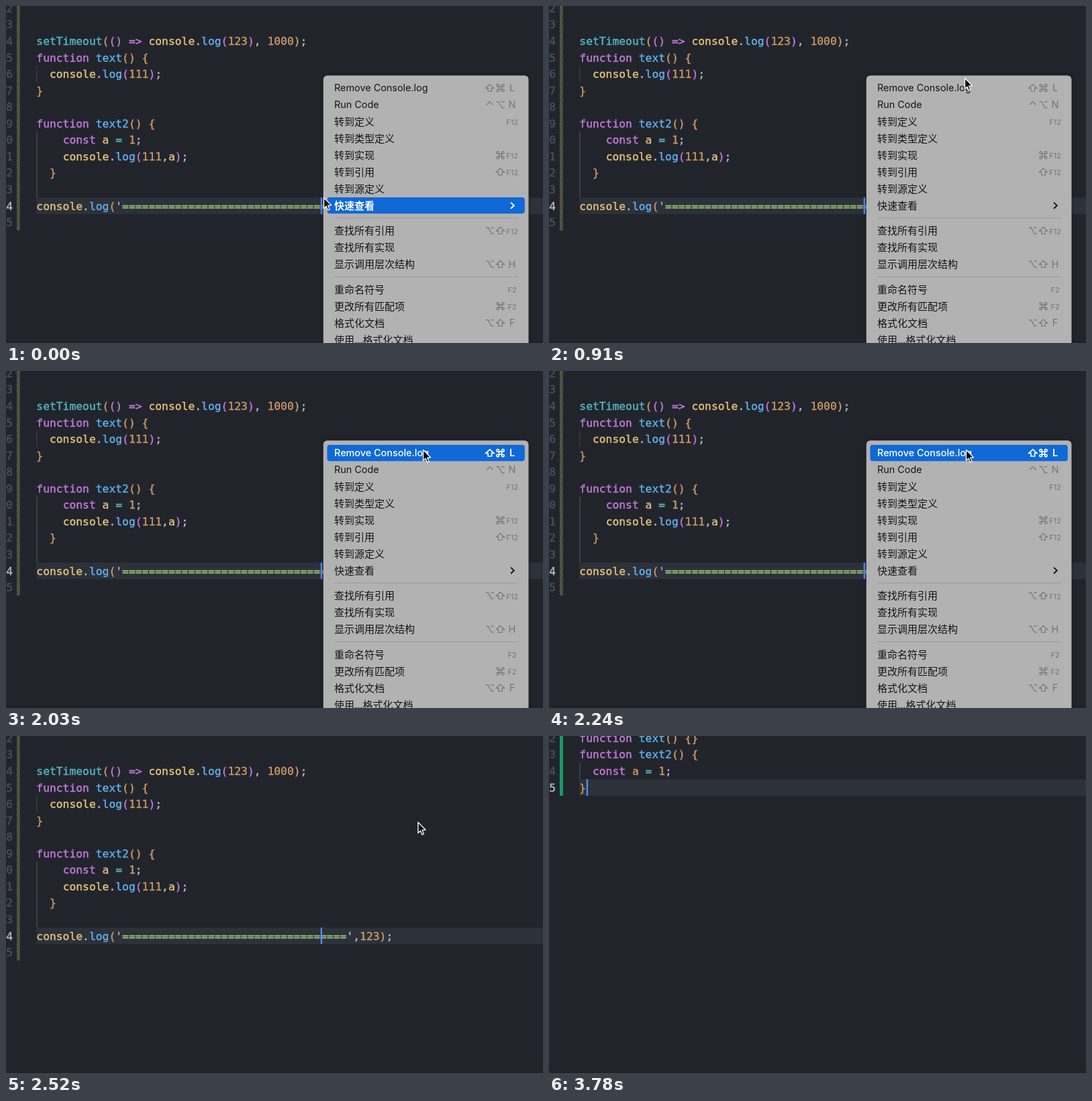
These frames come from a looping animation (800 px wide and 502 px high, 3.85 s). An HTML page with a canvas:

```html
<!DOCTYPE html>
<html lang="zh-CN">
<head>
<meta charset="utf-8">
<title>Remove Console.log</title>
<style>
html, body { margin: 0; width: 100%; height: 100%; overflow: hidden; background: #21252b; }
canvas { display: block; }
</style>
</head>
<body>
<canvas id="stage" width="800" height="502"></canvas>
<script>
const stage = document.getElementById('stage').getContext('2d');
const layer = Object.assign(document.createElement('canvas'), { width: 800, height: 502 }).getContext('2d');
let ctx = stage;

const LOOP = 3850, STEP = 70;
const CHAR = 9.832, LINE = 24.55, LEFT = 45.3;
const MENU = { x: 472.7, y: 103.6, w: 305.8, top: 122.2, row: 25 };
const FADE_START = 2300, FADE_END = 2480, EDIT_TIME = 2590, RECOLOUR_TIME = 3200;

const COLOUR = {
  text: '#b4bbc8', keyword: '#c678dd', builtin: '#56b6c2', object: '#e5c07b',
  call: '#61afef', string: '#98c379', number: '#d19a66', dim: '#495162'
};
const BRACKETS = ['#d19a66', '#c678dd', '#56b6c2'];

const BEFORE = {
  4: 'setTimeout(() => console.log(123), 1000);',
  5: 'function text() {',
  6: '  console.log(111);',
  7: '}',
  9: 'function text2() {',
  10: '    const a = 1;',
  11: '    console.log(111,a);',
  12: '  }',
  14: "console.log('" + '='.repeat(34) + "',123);"
};
const AFTER = {
  2: 'function text() {}',
  3: 'function text2() {',
  4: '  const a = 1;',
  5: '}'
};

// Label and shortcut; "-" is a separator
const ITEMS = [
  ['Remove Console.log', '⇧⌘L'], ['Run Code', '^⌥N'], ['转到定义', 'F12'],
  ['转到类型定义', ''], ['转到实现', '⌘F12'], ['转到引用', '⇧F12'],
  ['转到源定义', ''], ['快速查看', '>'], ['-'],
  ['查找所有引用', '⌥⇧F12'], ['查找所有实现', ''], ['显示调用层次结构', '⌥⇧H'], ['-'],
  ['重命名符号', 'F2'], ['更改所有匹配项', '⌘F2'], ['格式化文档', '⌥⇧F'], ['使用...格式化文档', '']
];

// time, x, y of the pointer tip
const POINTER = [
  [0, 473, 285], [420, 543, 199], [800, 619, 107], [1050, 619, 107], [1190, 621, 117],
  [2500, 621, 117], [2660, 560, 205], [2800, 452, 368], [2870, 426, 428], [2990, 398, 520]
];

const TOKEN = /(function|const|=>)|(setTimeout)|(console|\ba\b)|(log|text2?)|(={2,})|(\d+)|([(){}])|(=)|\s+|./g;
const TOKEN_KINDS = ['keyword', 'builtin', 'object', 'call', 'string', 'number', 'bracket', 'builtin'];

const lineY = n => 52.2 + (n - 4) * LINE;

function rect(colour, x, y, w, h) {
  ctx.fillStyle = colour;
  ctx.fillRect(x, y, w, h);
}

function text(str, x, y, font, colour, align = 'left') {
  ctx.font = font;
  ctx.textAlign = align;
  ctx.fillStyle = colour;
  ctx.fillText(str, x, y);
}

function roundRect(x, y, w, h, r) {
  ctx.beginPath();
  ctx.roundRect(x, y, w, h, r);
}

function polyline(x, y, points, close) {
  ctx.beginPath();
  for (const [px, py] of points) ctx.lineTo(x + px, y + py);
  if (close) ctx.closePath();
}

function pointerAt(t) {
  t = Math.max(0, t);
  const i = POINTER.findIndex(p => p[0] > t);
  if (i < 0) return POINTER[POINTER.length - 1].slice(1);
  const [t0, x0, y0] = POINTER[i - 1], [t1, x1, y1] = POINTER[i];
  const k = (t - t0) / (t1 - t0);
  return [x0 + (x1 - x0) * k, y0 + (y1 - y0) * k];
}

// Monospaced text with slightly thickened strokes
function codeText(str, x, y, colour, align) {
  text(str, x, y + 5.8, '16.33px "DejaVu Sans Mono", monospace', colour, align);
  ctx.strokeStyle = colour;
  ctx.lineWidth = 0.4;
  ctx.strokeText(str, x, y + 5.8);
}

function drawCode(lines, variableColour) {
  let depth = 0;
  for (const n in lines) {
    for (const m of lines[n].matchAll(TOKEN)) {
      const kind = TOKEN_KINDS[m.slice(1).findIndex(Boolean)] || 'text';
      let colour = COLOUR[kind];
      if (kind === 'bracket') {
        colour = BRACKETS['({'.includes(m[0]) ? depth++ : --depth];
      } else if (m[0] === 'a') {
        colour = variableColour;
      }
      codeText(m[0], LEFT + m.index * CHAR, lineY(n), colour);
    }
  }
}

function drawNumbers(last, active) {
  for (let n = 2; n <= last; n++) {
    codeText(n % 10, 10, lineY(n), n === active ? COLOUR.text : COLOUR.dim, 'right');
  }
}

function drawGuide(first, last, colour) {
  rect(colour, 45.4, lineY(first) - LINE / 2, 1.2, (last - first + 1) * LINE);
}

function drawHatch(bottom) {
  ctx.save();
  ctx.beginPath();
  ctx.rect(16, 0, 4.7, bottom);
  ctx.clip();
  ctx.strokeStyle = '#948b60';
  ctx.lineWidth = 1.15;
  ctx.beginPath();
  for (let y = 0; y < bottom + 6; y += 3.5) {
    ctx.moveTo(15, y + 1);
    ctx.lineTo(22, y - 6);
  }
  ctx.stroke();
  ctx.restore();
}

function drawEditor(t) {
  const edited = t >= EDIT_TIME;
  const active = edited ? 5 : 14, last = edited ? 5 : 15;
  rect('#21252b', 0, 0, 800, 502);
  rect('#1e2227', 0, 499.5, 800, 2.5);
  rect('#2c313a', LEFT, lineY(active) - LINE / 2, 800 - LEFT, LINE);
  drawNumbers(last, active);
  if (edited) {
    rect('#1b9868', 16, 0, 5, lineY(5) + LINE / 2);
    drawGuide(4, 4, '#4b5059');
    drawCode(AFTER, t < RECOLOUR_TIME ? COLOUR.object : COLOUR.number);
  } else {
    drawHatch(lineY(15) + LINE / 2);
    drawGuide(6, 6, '#3b4048');
    drawGuide(10, 13, '#4b5059');
    drawCode(BEFORE, COLOUR.object);
  }
  if (caretVisible(t)) {
    rect('#528bff', LEFT + (edited ? 1 : 43) * CHAR + 0.6, lineY(active) - LINE / 2, 2.4, LINE);
  }
}

// Blinks every half second; closing the menu and editing restart the blink
function caretVisible(t) {
  const since = t >= EDIT_TIME ? t - EDIT_TIME : t >= FADE_START ? t - FADE_START : t + 230;
  return since % 1000 < 500;
}

const ICONS = {
  '⇧'(x, y) {
    polyline(x, y, [[0, -5.3], [6, 0.2], [2.8, 0.2], [2.8, 4.8], [-2.8, 4.8], [-2.8, 0.2], [-6, 0.2]], true);
  },
  '⌘'(x, y) {
    ctx.beginPath();
    ctx.rect(x - 2, y - 2, 4, 4);
    for (const sx of [-1, 1]) {
      for (const sy of [-1, 1]) {
        ctx.moveTo(x + sx * 3.8 + 1.8, y + sy * 3.8);
        ctx.arc(x + sx * 3.8, y + sy * 3.8, 1.8, 0, Math.PI * 2);
      }
    }
  },
  '⌥'(x, y) {
    polyline(x, y, [[-6, -4.5], [-2.6, -4.5], [2.4, 4.5], [6, 4.5]]);
    ctx.moveTo(x + 1.5, y - 4.5);
    ctx.lineTo(x + 6, y - 4.5);
  },
  '^'(x, y) {
    polyline(x, y, [[-4.8, 0], [0, -4.6], [4.8, 0]]);
  }
};

function drawShortcut(keys, y, selected) {
  if (keys === '>') {
    ctx.strokeStyle = selected ? '#fff' : '#141414';
    ctx.lineWidth = 1.9;
    polyline(752, y, [[0, -4.6], [4.8, 0], [0, 4.6]]);
    ctx.stroke();
    return;
  }
  const colour = selected ? '#fff' : '#757576';
  const icons = [...keys].filter(key => ICONS[key]);
  const key = keys.slice(icons.length);
  ctx.strokeStyle = colour;
  ctx.lineWidth = selected ? 1.6 : 1.2;
  icons.reverse().forEach((icon, i) => {
    ICONS[icon](736.5 - i * 15.7, y);
    ctx.stroke();
  });
  const weight = selected ? 600 : 400;
  const size = key.length > 1 ? 11 : 14.5;
  text(key, 754, y + (key.length > 1 ? 4.8 : 5.2), `${weight} ${size}px Inter, sans-serif`, colour, 'center');
}

function drawMenu(t) {
  ctx.save();
  ctx.shadowColor = 'rgba(0,0,0,.5)';
  ctx.shadowBlur = 4;
  ctx.fillStyle = '#b2b2b3';
  roundRect(MENU.x, MENU.y, MENU.w, 420, 6);
  ctx.fill();
  ctx.restore();

  const hovered = Math.floor((pointerAt(t - STEP)[1] - MENU.top + 12.4) / MENU.row);
  let y = MENU.top;
  ITEMS.forEach(([label, keys], i) => {
    if (label === '-') {
      rect('#9a9a9b', 489, y - 6.8, 274, 1);
      y += MENU.row / 2;
      return;
    }
    const selected = i === hovered;
    if (selected) {
      ctx.fillStyle = '#0f69d6';
      roundRect(478.4, y - 12.2, 294.4, 24.2, 4);
      ctx.fill();
    }
    const latin = /^[A-Z]/.test(label);
    const font = latin
      ? `${selected ? 500 : 400} 14.4px Inter, sans-serif`
      : `${selected ? 700 : 400} 15px "Noto Sans CJK SC", "Noto Sans CJK", sans-serif`;
    text(label, 489, y + (latin ? 5.2 : 5.7), font, selected ? '#fff' : '#141414');
    drawShortcut(keys, y, selected);
    y += MENU.row;
  });
}

// Draws on a separate layer so that the whole menu fades as one picture
function fadeMenu(t) {
  const alpha = Math.min(1, (FADE_END - t) / (FADE_END - FADE_START));
  if (alpha <= 0) return;
  ctx = layer;
  ctx.clearRect(0, 0, 800, 502);
  drawMenu(t);
  ctx = stage;
  ctx.globalAlpha = alpha;
  ctx.drawImage(layer.canvas, 0, 0);
  ctx.globalAlpha = 1;
}

function drawPointer(t) {
  const [x, y] = pointerAt(t);
  polyline(x, y, [[0.5, 0.5], [0.5, 16.5], [4, 13.2], [6.5, 19], [9.1, 17.9], [6.7, 12.2], [11.6, 11.8]], true);
  ctx.fillStyle = '#0c0c0c';
  ctx.fill();
  ctx.strokeStyle = '#f4f4f4';
  ctx.lineWidth = 1.4;
  ctx.lineJoin = 'round';
  ctx.stroke();
  ctx.lineJoin = 'miter';
}

const start = performance.now();

function draw() {
  const elapsed = (performance.now() - start) % LOOP;
  const t = Math.floor(elapsed / STEP) * STEP;
  drawEditor(t);
  fadeMenu(t);
  drawPointer(t);
  requestAnimationFrame(draw);
}
draw();
</script>
</body>
</html>
```
